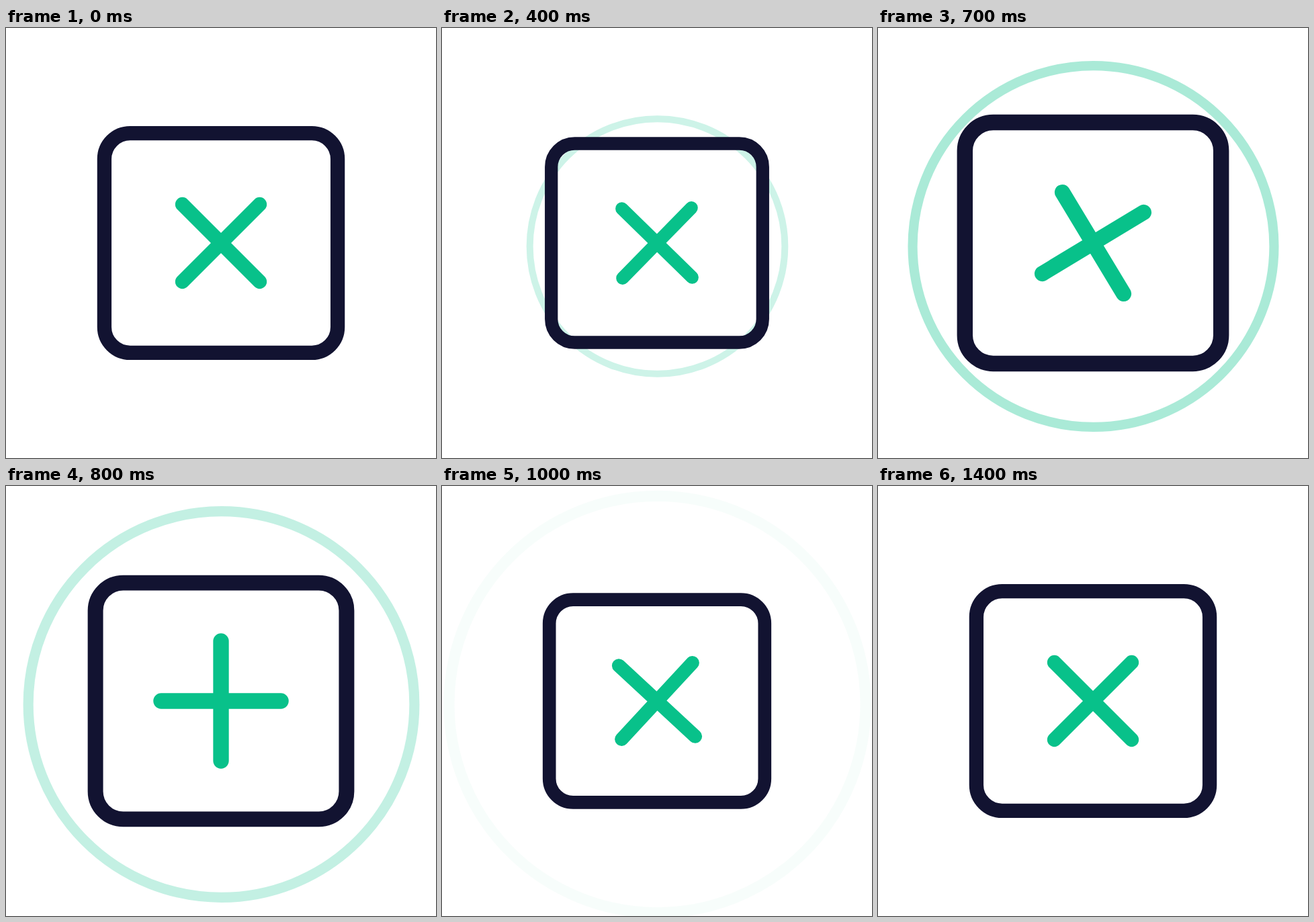
Animation of 640 by 640 pixels, one loop 2800 ms. Source, as an HTML page:

```html
<!DOCTYPE html>
<html lang="en">
<head>
<meta charset="utf-8">
<title>Plus and cross button</title>
<style>
  html, body { margin: 0; width: 100%; height: 100%; overflow: hidden; background: #fff; }
  svg { display: block; width: 100vw; height: 100vh; }
  .box { fill: none; stroke: #121331; stroke-width: 21.3; }
  .cross { fill: none; stroke: #08c18a; stroke-width: 21.3; stroke-linecap: round; }
  .ring { fill: none; stroke: #08c18a; stroke-width: 5.13; }
</style>
</head>
<body>
<svg viewBox="0 0 640 640">
  <circle id="ring" class="ring" r="97.43"/>
  <rect id="box" class="box" x="-173.6" y="-163.35" width="347.2" height="326.7" rx="38.4"/>
  <path id="cross" class="cross" d="M-57.5-57.5 57.5 57.5M57.5-57.5-57.5 57.5"/>
</svg>
<script>
  const LOOP = 2800, STEP = 100;
  const CROSS_LAG = 45;

  const ring = document.getElementById('ring');
  const box = document.getElementById('box');
  const cross = document.getElementById('cross');

  const progress = (t, from, to) => Math.min(1, Math.max(0, (t - from) / (to - from)));
  const easeSine = p => (1 - Math.cos(Math.PI * p)) / 2;
  const easeQuart = p => p < .5 ? 8 * p ** 4 : 1 - 8 * (1 - p) ** 4;

  // Squeeze, swell, squeeze, rest: mirrored around 720 ms.
  function pulse(t) {
    const part = (from, to) => easeSine(progress(t, from, to));
    return 1 - .1 * part(160, 360) + .2 * part(360, 720)
             - .2 * part(720, 1080) + .1 * part(1080, 1280);
  }

  // A quarter turn with a slight swing back before it and past it after.
  function turn(t) {
    const swing = Math.sin(2 * Math.PI * progress(t, 200, 1400));
    return 90 * easeQuart(progress(t, 400, 1200)) - .7 * swing;
  }

  const ringSize = t => .388 + 2.836 * Math.sin(Math.PI / 2 * progress(t, -28, 1126));
  const ringAlpha = t => .447 * (progress(t, 240, 600) - progress(t, 600, 1030));

  function place(el, x, y, scale, angle = 0) {
    el.setAttribute('transform', `translate(${x} ${y}) rotate(${angle}) scale(${scale})`);
  }

  function draw(time) {
    const t = Math.floor(time % LOOP / STEP) * STEP;
    // The first move shows at 200 ms.
    const scaleTime = t < 200 ? 0 : t;
    place(ring, 320.5, 325, ringSize(t));
    ring.setAttribute('opacity', ringAlpha(t));
    place(box, 320, 320, pulse(scaleTime));
    place(cross, 320, 320, pulse(scaleTime - CROSS_LAG), turn(t));
  }

  const begin = performance.now();
  function tick() {
    draw(performance.now() - begin);
    requestAnimationFrame(tick);
  }
  tick();
</script>
</body>
</html>
```
